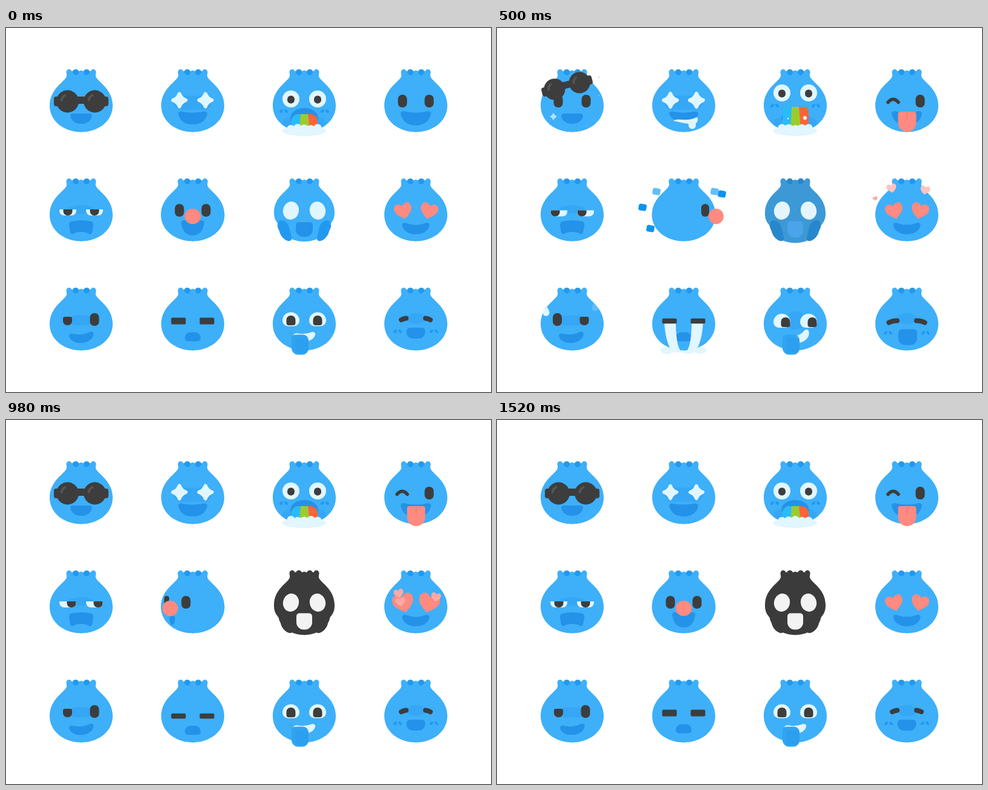
Write an HTML page with a canvas that moves like this. It is 800 px wide and 600 px high and loops after 1600 ms.

```html
<!DOCTYPE html>
<html lang="en">
<head>
<meta charset="utf-8">
<title>Blueberry emoji</title>
<style>
html, body { margin: 0; height: 100%; overflow: hidden; background: #fff; }
canvas { display: block; }
</style>
</head>
<body>
<canvas id="stage" width="800" height="600"></canvas>
<script>
const LOOP = 1600, LAST_CHANGE = 1520, TAU = Math.PI * 2;
const SKIN = '#3eaff9', FOLD = '#2299f0', MID = '#35a7f5', DEEP = '#2492e8';
const PALE = '#e1f6ff', INK = '#3d3d3d', PINK = '#ff8a80';
const c = document.getElementById('stage').getContext('2d');
c.lineCap = c.lineJoin = 'round';
let t = 0;

// Motion
const unit = v => Math.min(1, Math.max(0, v));
function ease(from, to, at = t) {
  const u = unit((at - from) / (to - from));
  return u * u * (3 - 2 * u);
}
// Rises between the first two times, falls between the last two.
const pulse = (a, b, d, e, at = t) => ease(a, b, at) - ease(d, e, at);
const act = () => pulse(100, 310, 720, 925);

// Drawing
function place(draw, x, y, turn = 0, sx = 1, sy = sx) {
  c.save();
  c.translate(x, y);
  c.rotate(turn);
  c.scale(sx, sy);
  draw();
  c.restore();
}
function fill(d, color) {
  c.fillStyle = color;
  c.fill(new Path2D(d));
}
function line(d, color, width) {
  c.strokeStyle = color;
  c.lineWidth = width;
  c.stroke(new Path2D(d));
}
function oval(x, y, rx, ry, color, turn = 0) {
  c.fillStyle = color;
  c.beginPath();
  c.ellipse(x, y, rx, ry, turn, 0, TAU);
  c.fill();
}
function box(x, y, w, h, r, color) {
  c.fillStyle = color;
  c.beginPath();
  c.roundRect(x - w / 2, y - h / 2, w, h, r);
  c.fill();
}
function faded(alpha, draw) {
  c.save();
  c.globalAlpha = alpha;
  draw();
  c.restore();
}
function mirrored(draw) {
  draw();
  place(draw, 0, 0, 0, -1, 1);
}
function mix(from, to, u) {
  const channel = (hex, i) => parseInt(hex.slice(i, i + 2), 16);
  return `rgb(${[1, 3, 5].map(i => Math.round(channel(from, i) * (1 - u) + channel(to, i) * u))})`;
}

// Shared parts
const ROUND = 'M1 71H-24V77C-21 86-52 97-52 128C-52 153-29 171.5 1 171.5Z';
const SQUEEZED = 'M1 71H-24V77C-21 86-50 95-50 124C-50 140-42 141-39 150C-32 167-14 172 1 172Z';
function body(shape = ROUND, skin = SKIN, fold = FOLD) {
  mirrored(() => {
    fill(shape, skin);
    oval(-20, 73, 4.6, 5, skin);
    oval(-9, 72.5, 5, 4.5, fold);
    fill('M-14 72H-4Q-5 77-8 78Q-12 77-14 72Z', fold);
  });
  oval(0, 74, 4, 4, skin);
}
const eye = (x, w = 15) => box(x, 120.5, w, 21, w * .48, INK);
const smile = (x, y, w, h, sag = 0, turn = 0, color = DEEP) => place(() => fill(
  `M${-w} 4Q${-w} 0 ${5 - w} 0Q0 ${sag} ${w - 5} 0Q${w} 0 ${w} 4C${w * .9} ${h * .75} ${w * .5} ${h} 0 ${h}C${-w * .5} ${h} ${-w * .9} ${h * .75} ${-w} 4Z`,
  color), x, y, turn);
const star = (x, y, size, color = PALE) => place(() => {
  const d = 'M0-10.5Q2.5-3 10.5 0Q2.5 3 0 10.5Q-2.5 3-10.5 0Q-2.5-3 0-10.5Z';
  fill(d, color);
  line(d, color, 6);
}, x, y, 0, size);
const heart = (x, y, size, turn, color) => place(() => fill(
  'M0 13.5C-5 9-15 4-14.5-5C-14-14-4-15 0-8C4-15 14-14 14.5-5C15 4 5 9 0 13.5Z', color), x, y, turn, size);
const blush = (x, y) => mirrored(() => line(`M${x} ${y - 1}l2 2M${x - 8} ${y + 1}l2-2`, FOLD, 4));

function shades() {
  body();
  const up = pulse(100, 300, 530, 650);
  const smirk = pulse(150, 340, 380, 490);
  smile(5 * smirk, 141, 18, 17, 0, -.2 * smirk);
  eye(-23);
  eye(23);
  place(() => {
    box(0, -2, 24, 12, 4, INK);
    mirrored(() => {
      oval(-22.5, 0, 18.5, 18.5, INK);
      box(-40, 0, 10, 16, 4, INK);
    });
    for (const x of [-22.5, 22.5]) line(`M${x - 10} -2Q${x - 9} -8 ${x - 4} -10`, '#555', 4);
  }, -8.5 * up, 121 - 25.5 * up, -.26 * up, 1 - .05 * up);
  const twinkle = (x, y, peak, size, color) => {
    const near = 1 - Math.abs(t - peak) / 170;
    if (near > 0) star(x, y, size * Math.sin(near * TAU / 4), color);
  };
  twinkle(44, 111, 340, .58);
  twinkle(-31, 146, 495, .4, '#b4e4ff');
  twinkle(44, 81, 650, .38, '#66c2fa');
}

function starry() {
  body();
  box(0, 123, 62, 23, 11, MID);
  for (const x of [-22, 21]) star(x, 119, 1 + .03 * Math.sin(t / LOOP * TAU * 4));
  const drool = act();
  smile(0, 137.5, 24, 21.5 - 5 * drool, 4);
  faded(drool, () => {
    fill('M-17 153Q-14 150-4 151Q14 152 21 147Q25 149 22 155Q18 161 8 158Q-5 156-17 153Z', PALE);
    box(14, 152 + 7 * drool, 12, 15, 6, PALE);
  });
}

function rainbow() {
  body();
  oval(0, 156, 36, 12, MID);
  const flow = act();
  const start = 142 - 12 * flow, corner = 12 - 5 * flow;
  for (const x of [-22, 22]) {
    oval(x, 117 - 10 * flow, 14, 14, PALE);
    box(x, 118 - 10 * flow, 12, 13, 6, INK);
  }
  blush(-31, 137 - 9 * flow);
  fill('M-22 152C-25 139-13 132 0 132C13 132 25 139 22 152Z', DEEP);
  c.save();
  c.beginPath();
  c.roundRect(-21, start, 43, 166 - start, [corner, corner, 0, 0]);
  c.clip();
  box(0, 148, 50, 40, 0, '#ff6438');
  fill(`M-25 ${start}H6L9 168H-25Z`, '#9ccc2c');
  fill(`M-25 ${start}H-6L-8 168H-25Z`, '#27bcff');
  faded(flow, () => {
    oval(-12, 130 + (t / 5 + 27) % 36, 1.3, 1.3, PALE);
    oval(16, 130 + (t / 5 + 26) % 36, 3, 3, PALE);
  });
  c.restore();
  oval(0, 169.5, 36, 8.5, PALE);
  for (let i = -2; i <= 2; i++) oval(i * 11, 165 + Math.sin(t / 400 * TAU + i * 2), 6.5, 6, PALE);
}

function wink() {
  body();
  eye(22);
  if (t < 340) place(() => eye(0), -22, 120.5 * ease(160, 340), 0, 1, 1 - ease(160, 340));
  place(() => line('M-8.5 3Q0-7 8.5 3', INK, 5.5), -22.5, 119.5, 0, ease(290, 450));
  smile(0, 137, 25, 23.5, 5);
  const out = ease(370, 480);
  const lip = 138 + 4 * ease(490, 620);
  if (out) {
    box(.5, lip + 16.5 * out, 30, 33 * out, [4, 4, 15, 15], PINK);
    line(`M.5 ${lip + 2}v${10 * out}`, '#f57a74', 2);
  }
}

function unamused() {
  body();
  oval(0, 119, 20, 7, MID);
  const look = 12 * ease(680, 930) - 6 * ease(100, 530) - 6 * ease(1000, 1150);
  const y = 124 + 1.5 * act();
  for (const x of [-22, 22]) {
    box(x, y, 28, 10, [1, 1, 8, 8], PALE);
    box(x + look, y, 15, 10, [0, 0, 7, 7], INK);
  }
  fill('M-17 139Q0 135 17 139Q20 140 20 146L18 157Q16 162 11 158Q0 154-11 158Q-16 162-18 157L-20 146Q-20 140-17 139Z', DEEP);
}

function spinner() {
  // Loose chips swing outwards while they fall.
  const chip = (x, y, birth, end, color) => {
    const age = t - 360;
    const swing = Math.sign(x) * 9 * Math.sin(age / 300 * Math.PI);
    place(() => box(0, 0, 13, 11, 3, color), x + swing, y + .21 * age, .8 - age / 220,
      pulse(birth, birth + 60, end - 60, end));
  };
  for (const [x, y, end] of [[-59, 86, 740], [54, 64, 740], [-46, 121, 600]]) chip(x, y, 290, end, '#0e93f0');
  place(body, 0, 0, 0, 1.01, 1);
  for (const x of [-36, 42]) chip(x, 60, 430, 730, '#62bef9');

  const turn = TAU * (1 - (1 - unit((t - 380) / 820)) ** 1.6);
  const front = Math.cos(turn), side = Math.sin(turn);
  const pout = pulse(100, 330, 980, 1120);
  if (front > .25) place(() => smile(0, 137 + 6 * pout, 19 - 12.5 * pout, 25 - 10 * pout), 49 * side, 0, 0, front, 1);
  for (const a of [-.51, .51]) {
    const facing = Math.cos(turn + a);
    if (facing > .25) eye(45 * Math.sin(turn + a), 15 * Math.min(1, facing + .25));
  }
  if (front > 0) oval(54 * side, 130.5, 12.3 + front, 12.8, PINK);
}

function scream() {
  const pull = ease(80, 340), dark = unit((t - 460) / 215);
  const skin = mix(SKIN, '#3b3b3b', dark);
  const eyes = mix(PALE, '#f3f3f3', dark);
  place(() => body(SQUEEZED, skin, mix(FOLD, '#3b3b3b', dark)), 0, -1.7 * pull, 0, 1, 1 + .023 * pull);
  mirrored(() => {
    oval(-22, 121, 13, 15, eyes, .25);
    place(() => fill('M-42 139C-36 134-28 139-25 148L-21 165Q-20 172-27 171C-36 168-40 160-41 155Q-47 145-42 139Z',
      mix(FOLD, '#3b3b3b', dark)), 2 * pull, 0);
  });
  box(0, 152, 28 - 2 * pull, 24 + 3 * pull, [5, 5, 12, 12], mix(DEEP, '#f3f3f3', dark));
}

function smitten() {
  body();
  smile(0, 141, 22.5, 19, 7);
  const p = t % (LOOP / 2);
  const beat = 1 + .2 * pulse(40, 170, 180, 340, p);
  heart(-20.5, 121.5, beat, -.25, PINK);
  heart(21.5, 121.5, beat, .25, PINK);
  // Small hearts fly off: start x and y, heading in degrees, birth, end
  for (const [x, y, heading, birth, end] of [
    [-28, 106, -128, 180, 450], [-25, 120, -145, 180, 545], [33, 112, -55, 180, 450],
    [-25, 116, -90, 240, 600], [20, 105, -60, 340, 690]
  ]) {
    const life = unit(Math.min((p - birth + 60) / 60, (end - p) / 90));
    const way = 33 * unit((p - birth) / (end - birth - 90));
    const a = heading / 360 * TAU;
    heart(x + way * Math.cos(a), y + way * Math.sin(a), .55 * life, Math.sign(x) * .22,
      birth > 180 ? '#ffc3c0' : '#ffa9a3');
  }
}

function sweating() {
  body();
  box(0, 122, 40, 16, 8, MID);
  const swap = pulse(100, 300, 520, 640);
  const lid = (x, open) => {
    const r = 3 + 4 * open;
    box(x - 2 * swap, 123 - 2.5 * open, 15, 14 + 7 * open, [r, r, 7, 7], INK);
  };
  lid(-22.5, swap);
  lid(22, 1 - swap);
  smile(-2 * swap, 142, 20.5, 17, 6, -.1);
  [[38, 93], [-43, 104], [13, 75], [-23, 85]].forEach(([x, y], i) => {
    const age = t - 330 - 104 * i;
    if (age < 0 || age > 260) return;
    faded(1 - .8 * ease(70, 130, age) - .2 * ease(170, 260, age), () => place(
      () => fill('M0-7C3-3 5 0 5 3A5 5 0 0 1-5 3C-5 0-3-3 0-7Z', PALE),
      x, y + age * .03, 0, .6 + .5 * ease(0, 70, age)));
  });
}

function crying() {
  const pool = 39 * pulse(240, 400, 700, 900);
  oval(0, 170, pool, 5, PALE);
  for (const i of [-.7, .2, .7]) oval(pool * i, 172 + Math.sin(t / 90 + i * 5), pool * .25, pool / 8, PALE);
  body();
  const dip = pulse(0, 340, 340, 480) + pulse(720, 950, 1160, 1480);
  const height = 11 - 2.5 * pulse(0, 340, 1160, 1480);
  box(0, 149 + 2.5 * dip, 26, 15, [9, 9, 5, 5], DEEP);
  const head = 125 + 49 * ease(140, 330), tail = 125 + 49 * ease(720, 1030);
  c.save();
  c.beginPath();
  c.rect(-60, tail, 120, Math.max(0, head - tail));
  c.clip();
  mirrored(() => fill('M-32 125C-31 145-27 160-21 171Q-13 173-6 171C-10 165-13 150-13 125Z', PALE));
  c.restore();
  for (const x of [-23.5, 23.5]) box(x, 123 + 5 * dip, 24, height, 2, INK);
}

function thinking() {
  body();
  const u = act();
  faded(u, () => box(0, 122, 30, 30, 14, MID));
  for (const x of [-22, 22]) {
    box(x, 120 + 2.5 * u, 28, 23, [14, 14, 9, 9], PALE);
    box(x + 6 * u, 122 + 3 * u, 15, 16, [7, 7, 4, 4], INK);
  }
  smile(7 * u, 142 + u, 18 - 3 * u, 15, 4, -.08 - .45 * u, PALE);
  box(-7, 162, 28, 33, [7, 9, 10, 11], '#2fa4f3');
  box(-4, 163, 22, 24, 7, '#2c9fef');
}

function laughing() {
  body();
  oval(0, 119, 17, 9, MID);
  const u = act();
  mirrored(() => line(
    `M${-24 - 5.5 * u} ${121 + 4.5 * u}Q${-20 - 3 * u} ${119 + 3 * u} -16 ${118.5 + 4 * u}`, INK, 8));
  blush(-27 - u, 140 + 2.5 * u);
  const sway = -u * (.5 + 2 * Math.cos((t - 360) / 300 * TAU));
  box(sway, 143 + 6.5 * u, 31, 18 + 8 * u, [6, 6, 11, 11], DEEP);
}

const FACES = [shades, starry, rainbow, wink, unamused, spinner, scream, smitten, sweating, crying, thinking, laughing];
function frame() {
  t = Math.min(performance.now() % LOOP, LAST_CHANGE);
  c.fillStyle = '#fff';
  c.fillRect(0, 0, 800, 600);
  FACES.forEach((face, i) => place(face, 124 + 184 * (i % 4), 180 * Math.floor(i / 4)));
  requestAnimationFrame(frame);
}
frame();
</script>
</body>
</html>
```
